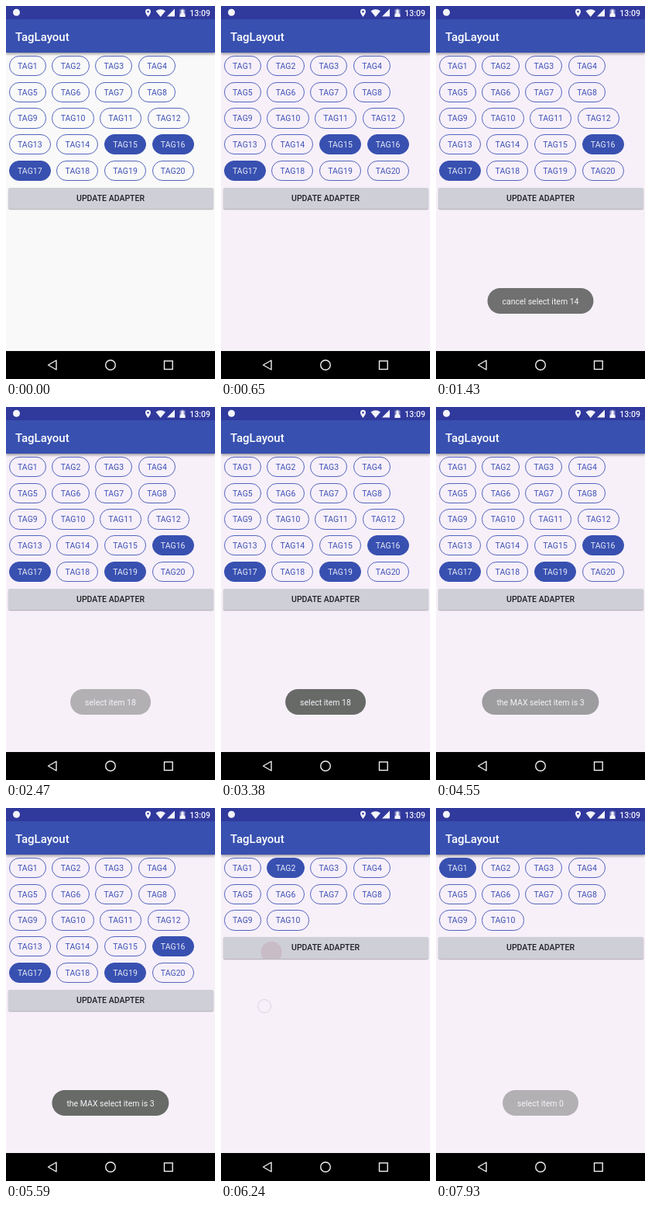
Write an HTML page that moves like this. It is 270 px wide and 480 px high and loops after 8000 ms.

```html
<!DOCTYPE html>
<html lang="en">
<head>
<meta charset="utf-8">
<title>TagLayout</title>
<style>
  html, body { margin: 0; width: 100%; height: 100%; overflow: hidden; }
  body { font: 10.5px Roboto, sans-serif; }
  #stage { position: relative; width: 270px; height: 480px; overflow: hidden; background: #f7f0f9; }
  #stage.fresh { background: #f9f9f9; }
  .status, .bar, .nav, .toast, .touch { position: absolute; }
  .status { left: 0; top: 0; width: 270px; height: 17px; background: #30399c; }
  .status svg, .nav svg { display: block; }
  .clock { position: absolute; right: 6px; top: 2px; line-height: 15px; font-weight: 500; color: #f4f4fa; }
  .bar {
    left: 0; top: 17px; width: 270px; height: 43px; box-sizing: border-box; padding-left: 12px;
    background: #3850b0; color: #fff; font-size: 15px; font-weight: 500; line-height: 46px;
    box-shadow: 0 2px 3px rgba(0, 0, 0, .35);
  }
  .tags { position: absolute; left: 0; top: 63.75px; width: 270px; }
  #list { display: flex; flex-wrap: wrap; gap: 7.5px; padding: 0 3.75px; }
  .tag {
    box-sizing: border-box; height: 26.25px; padding: 0 10.25px; border: 1px solid #5565be;
    border-radius: 13.2px; line-height: 25px; color: #3f51b5; white-space: nowrap;
  }
  .tag.on { background: #3850b0; border-color: #3850b0; color: #e8ebf8; }
  .button {
    position: relative; margin: 8.5px 2.5px 0; height: 27.5px; border-radius: 2px; overflow: hidden;
    background: #cfcfd8; color: #202024; font-weight: 500; line-height: 27px; text-align: center;
    box-shadow: 0 1px 1.5px rgba(0, 0, 0, .3);
  }
  .button span { position: relative; }
  #ripple { position: absolute; left: 0; top: 0; border-radius: 50%; background: #c8bcc6; }
  .touch { left: 47px; top: 246px; width: 16px; height: 16px; border: 1px solid #dad4de; border-radius: 50%; }
  .toast {
    left: 50%; top: 363px; height: 33px; padding: 0 19px; border-radius: 16.5px; transform: translateX(-50%);
    background: #686a68; color: #f4f4f8; line-height: 35px; white-space: nowrap;
  }
  .nav { left: 0; top: 444px; width: 270px; height: 36px; background: #000; }
</style>
</head>
<body>
<div id="stage">
  <div class="tags">
    <div id="list"></div>
    <div class="button"><i id="ripple"></i><span>UPDATE ADAPTER</span></div>
  </div>
  <div class="bar">TagLayout</div>
  <div class="status">
    <svg width="270" height="17" fill="#f4f4fa">
      <circle cx="13.5" cy="8.3" r="4.5"/>
      <path fill-rule="evenodd" d="M183.5 14C181 10.5 180 9 180 7.3A3.5 3.5 0 0 1 187 7.3C187 9 186 10.5 183.5 14ZM183.5 6A1.3 1.3 0 1 0 183.5 8.6A1.3 1.3 0 1 0 183.5 6Z"/>
      <path d="M193.5 6.5Q199.7 2 206 6.5L199.7 14Z"/>
      <path d="M208 13.5H218V3.5Z"/>
      <path d="M224.5 4.5H226.5V3.5H229.5V4.5H231.5V14H224.5Z" opacity=".45"/>
      <path d="M226.5 5H229.5V9L231.5 11V14H224.5V11L226.5 9Z"/>
    </svg>
    <div class="clock">13:09</div>
  </div>
  <div class="touch" id="touch"></div>
  <div class="toast" id="toast"></div>
  <div class="nav">
    <svg width="270" height="36" fill="none" stroke="#f0f0f0" stroke-width="1.4">
      <path d="M54.5 18L65 12V24Z" stroke-linejoin="round"/>
      <circle cx="135" cy="18" r="6.3"/>
      <rect x="204.5" y="12.8" width="10.7" height="10.7"/>
    </svg>
  </div>
</div>
<script>
const LOOP = 8000, STEP = 130, UPDATE = 6240, PRESS = 6110;
const el = id => document.getElementById(id);
const clamp = x => Math.min(1, Math.max(0, x));

const toasts = [
  { text: 'cancel select item 14', start: 1050, end: 1950 },
  { text: 'select item 18', start: 2282, end: 3900 },
  { text: 'the MAX select item is 3', start: 4300, end: 5700 },
  { text: 'select item 0', start: 7742, end: 9700 }
];

const tags = Array.from({ length: 20 }, (_, i) => {
  const tag = document.createElement('div');
  tag.className = 'tag';
  tag.textContent = 'TAG' + (i + 1);
  el('list').append(tag);
  return tag;
});

function selection(t) {
  if (t >= 7540) return [1];
  if (t >= UPDATE) return [2];
  if (t >= 2210) return [16, 17, 19];
  return t >= 1040 ? [16, 17] : [15, 16, 17];
}

function drawToast(t) {
  const now = toasts.find(n => t >= n.start && t < n.end + 300);
  el('toast').style.opacity = now ? clamp((t - now.start) / 400) * clamp(1 - (t - now.end) / 300) : 0;
  if (now) el('toast').textContent = now.text;
}

// The ripple grows from the finger while drifting to the button's centre.
function drawRipple(t) {
  const p = clamp((t - PRESS) / 600) ** 1.42;
  const r = 122 * p;
  const x = 53.5 + 79 * p, y = 20.5 - 6.5 * p;
  const s = el('ripple').style;
  s.width = s.height = 2 * r + 'px';
  s.transform = `translate(${x - r}px, ${y - r}px)`;
  s.opacity = clamp(1 - (t - 6370) / 520);
}

function render(t) {
  const on = selection(t);
  el('stage').className = t < STEP ? 'fresh' : '';
  tags.forEach((tag, i) => {
    tag.classList.toggle('on', on.includes(i + 1));
    tag.style.display = i >= 10 && t >= UPDATE ? 'none' : '';
  });
  el('touch').style.opacity = t >= PRESS && t <= UPDATE ? 1 : 0;
  drawRipple(t);
  drawToast(t);
}

const begin = performance.now();
function tick() {
  const t = (performance.now() - begin) % LOOP;
  render(Math.floor(t / STEP) * STEP);
  requestAnimationFrame(tick);
}
tick();
</script>
</body>
</html>
```
